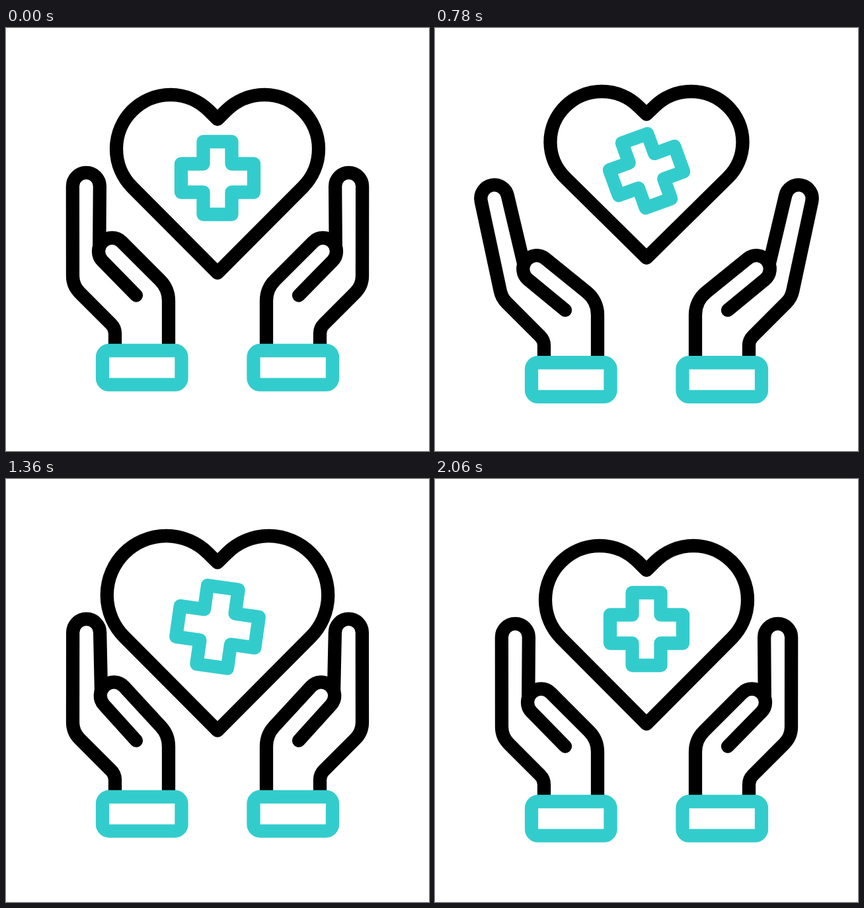
Write an HTML page with a canvas that moves like this. It is 640x640 px and loops after 2320 ms.

```html
<!DOCTYPE html>
<html lang="en">
<head>
<meta charset="utf-8">
<title>Caring hands</title>
<style>
  html, body { margin: 0; width: 100%; height: 100%; overflow: hidden; background: #fff; }
  canvas { display: block; width: 640px; height: 640px; }
</style>
</head>
<body>
<canvas id="stage" width="640" height="640"></canvas>
<script>
const ctx = document.getElementById('stage').getContext('2d');
const LOOP = 2320, STEP = 20, START = 200, END = 2060;
const BLACK = '#000', TEAL = '#33cccc', TIP = 20.5;

const smooth = u => (1 - Math.cos(Math.PI * u)) / 2;
const out = power => u => 1 - (1 - u) ** power;
const rad = deg => deg * Math.PI / 180;
const polar = (x, y, r, angle) => [x + r * Math.cos(angle), y + r * Math.sin(angle)];

// A track starts in one pose; each move eases to the next pose by its end time.
function track(rest, ...moves) {
  return t => {
    let from = rest, begin = START;
    for (const [end, pose, ease = smooth] of moves) {
      if (t < end) {
        const k = ease(Math.max(0, (t - begin) / (end - begin)));
        return from.map((v, i) => v + (pose[i] - v) * k);
      }
      from = pose;
      begin = end;
    }
    return from;
  };
}

// Hands: vertical shift, finger lean in degrees.
const REST = [0, 0], UP = [-17, 4.8], DOWN = [22.5, -14], SETTLE = [2.5, -2.6];
const handPose = track(REST,
  [320, UP], [1100, DOWN, out(2.5)], [1200, DOWN],
  [1440, UP], [1640, SETTLE, out(2)], [END, REST]);

// Heart size: width, height, cross offset from the middle.
const NORMAL = [1, 1, -27.5], SQUASH = [0.84, 0.81, -18], BIG = [1.093, 1.093, -30];
const LANDED = [0.832, 0.832, -23], REBOUND = [1.04, 1.04, -28.5];
const heartSize = track(NORMAL,
  [480, SQUASH], [1130, BIG], [1360, BIG],
  [1600, LANDED], [1820, REBOUND], [END, NORMAL]);

const heartMiddle = track([254.5],
  [400, [276.5]], [1150, [227.5], out(2)], [1255, [227.5]],
  [1470, [282]], [1790, [246]], [END, [254.5]]);

const crossTurn = track([0],
  [400, [-4.5]], [985, [98]], [1360, [98]], [1600, [84]], [END, [90]]);

function hand(shift, lean) {
  const wrist = 454 + shift, elbow = 390 + shift, end = 484 + shift;
  const a = rad(lean), th = rad(-0.33 * shift);

  const baseX = 197, baseY = 404.5 + 1.23 * shift;
  const sin = Math.sin(th), cos = Math.cos(th);
  const tx = baseX - 36.5 * cos + 66.5 * sin;
  const ty = baseY - 36.5 * sin - 66.5 * cos;
  const [fx, fy] = polar(101, elbow, 152 + 0.1 * lean, rad(7.7 - 90) + a);

  ctx.strokeStyle = BLACK;
  ctx.beginPath();
  ctx.moveTo(165, end);
  ctx.arcTo(165, wrist, 101, elbow, 20);
  ctx.arcTo(101, elbow, ...polar(fx, fy, TIP, Math.PI + a), 36);
  ctx.arc(fx, fy, TIP, Math.PI + a, 2 * Math.PI + a);
  ctx.lineTo(...polar(tx, ty, TIP, rad(200)));
  ctx.stroke();

  ctx.beginPath();
  ctx.moveTo(baseX, baseY);
  ctx.arc(tx, ty, TIP, rad(135) + th, rad(315) + th);
  ctx.arcTo(246, 394.5 + shift, 246, end, 44);
  ctx.lineTo(246, end);
  ctx.stroke();

  ctx.strokeStyle = TEAL;
  ctx.beginPath();
  ctx.roundRect(146, 488 + shift, 119.5, 51.7, 10);
  ctx.stroke();
}

function heart(middle, width, height) {
  ctx.save();
  ctx.translate(320, middle);
  ctx.scale(width, height);
  ctx.beginPath();
  ctx.moveTo(0, 116);
  ctx.arc(-71, -71.5, 82, rad(135), rad(315));
  ctx.lineTo(0, -116.5);
  ctx.arc(71, -71.5, 82, rad(225), rad(405));
  ctx.closePath();
  ctx.restore();
  ctx.strokeStyle = BLACK;
  ctx.stroke();
}

function cross(y, scale, turn) {
  const arm = 55, half = 21.5;
  ctx.save();
  ctx.translate(320, y);
  ctx.rotate(rad(turn));
  ctx.scale(scale, scale);
  ctx.beginPath();
  for (let i = 0; i < 4; i++) {
    ctx.lineTo(-half, -arm);
    ctx.lineTo(half, -arm);
    ctx.lineTo(half, -half);
    ctx.rotate(Math.PI / 2);
  }
  ctx.closePath();
  ctx.restore();
  ctx.strokeStyle = TEAL;
  ctx.stroke();
}

function draw(t) {
  ctx.fillStyle = '#fff';
  ctx.fillRect(0, 0, 640, 640);
  ctx.lineWidth = 20.3;
  ctx.lineCap = ctx.lineJoin = 'round';

  const [middle] = heartMiddle(t), [turn] = crossTurn(t);
  const [width, height, offset] = heartSize(t);
  heart(middle, width, height);
  cross(middle + offset, width, turn);

  const pose = handPose(t);
  hand(...pose);
  ctx.save();
  ctx.translate(640, 0);
  ctx.scale(-1, 1);
  hand(...pose);
  ctx.restore();
}

const start = performance.now();
function tick() {
  const t = (performance.now() - start) % LOOP;
  draw(Math.floor(t / STEP) * STEP);
  requestAnimationFrame(tick);
}
tick();
</script>
</body>
</html>
```
